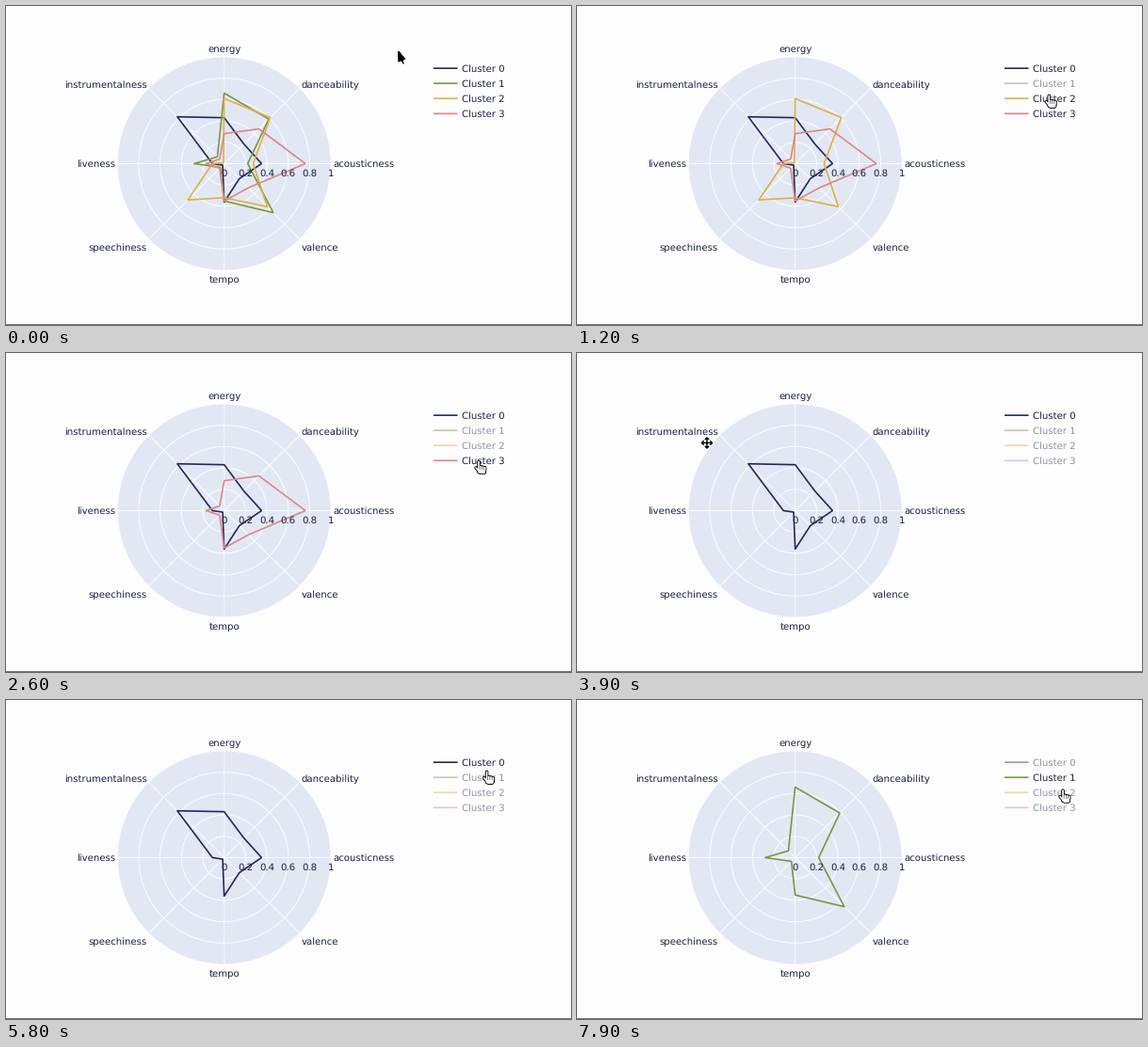
Animation of 600 by 339 pixels, one loop 8000 ms. Source, as a matplotlib script:

```python
import numpy as np
import matplotlib.pyplot as plt
from matplotlib.animation import FuncAnimation
from matplotlib.patches import Circle, Rectangle

W, H, DPI = 600, 339, 64
FRAMES, STEP = 80, 100
CX, CY, R = 231.7, 167.5, 113.5
INK = "#18203f"
PT = 72 / DPI
GAP = (np.nan, np.nan)

plt.rcParams.update({
    "font.family": "DejaVu Sans",
    "font.size": 10.1 * PT,
    "text.hinting": "none",
    "toolbar": "None",
})

FEATURES = ["acousticness", "danceability", "energy", "instrumentalness",
            "liveness", "speechiness", "tempo", "valence"]
CLUSTERS = {
    "#22285f": [.35, .26, .43, .62, .11, .02, .36, .20],
    "#7a983f": [.22, .59, .66, .09, .28, .05, .35, .65],
    "#e2ae42": [.27, .61, .61, .01, .11, .48, .32, .57],
    "#e08586": [.76, .46, .28, .06, .17, .06, .35, .32],
}

# Pointer: (time, x, legend row) for clicks, (time, x, y) for other stops
CLICKS = [(600, 505, 1), (1400, 500, 2), (2500, 502, 3),
          (5900, 508, 1), (7000, 513, 0)]
RESTS = [(-200, 417, 49), (3700, 138, 95.5), (4800, 496, 81),
         (5400, 518, 55), (7400, 531, 46), (7900, 516, 95)]
DWELL, TOGGLE_DELAY = 200, 500


def row_y(n):
    return 66.2 + 16.05 * n


def polar(r, deg):
    a = np.radians(deg)
    return CX + R * r * np.cos(a), CY - R * r * np.sin(a)


def strokes(*lines):
    """Join polylines into one array, separated by gaps."""
    return np.array([p for line in lines for p in [*line, GAP]], float)


def arrow():
    fan = [[(0, 0), (6.6 * s, 10 - 2.8 * s)] for s in np.linspace(0, 1, 7)]
    return strokes(*fan, [(3, 7.5), (5, 12)])


def hand():
    fingers = [[(2.2 * k, 5.8 + .5 * k), (2.2 * k, 10)] for k in (1, 2, 3)]
    palm = [[(0, y), (6.4, y)] for y in (11, 12.3)]
    return strokes([(0, 1.2), (0, 11)], *fingers, *palm,
                   [(-3, 7.6), (0, 11), (1.8, 13), (5.6, 13)])


def crosshair(size):
    return strokes([(-size, 0), (size, 0)], [(0, -size), (0, size)])


def four_arrows():
    tips = []
    for a in np.arange(4) * np.pi / 2:
        along = np.array([np.cos(a), np.sin(a)])
        side = 1.9 * np.array([-along[1], along[0]])
        tips.append([3.7 * along + side, 5.6 * along, 3.7 * along - side])
    return np.vstack([crosshair(5), strokes(*tips)])


# name: (strokes, outline colour, outline width, inner colour, inner width)
POINTERS = {
    "arrow": (arrow(), "white", 2.6, "black", 1.5),
    "hand": (hand(), "black", 3.5, "white", 1.7),
    "cross": (crosshair(6), "white", 2.4, "black", 1.2),
    "move": (four_arrows(), "white", 2.8, "black", 1.4),
}


def pointer_kind(x, y):
    d = np.hypot(x - CX, y - CY)
    if 450 < x < 536 and row_y(-.5) < y < row_y(3.5):
        return "hand"
    if d < R:
        return "cross"
    return "move" if d < R + 21 else "arrow"


STOPS = sorted(RESTS + [(t, x, row_y(n)) for t, x, n in CLICKS])


def pointer_at(t):
    for (t0, *a), (t1, *b) in zip(STOPS, STOPS[1:]):
        if t <= t1:
            break
    u = np.clip((t - t0 - DWELL) / (t1 - t0 - DWELL), 0, 1)
    u = u * u * (3 - 2 * u)
    return np.array(a) * (1 - u) + np.array(b) * u


def is_shown(n, t):
    hits = sum(row == n and t >= when + TOGGLE_DELAY
               for when, _, row in CLICKS)
    return hits % 2 == 0


fig = plt.figure(figsize=(W / DPI, H / DPI), dpi=DPI, facecolor="#fdfdfe")
ax = fig.add_axes([0, 0, 1, 1])
ax.set(xlim=(0, W), ylim=(H, 0))
ax.axis("off")


def stroke(x, y, color, width, z, cap="butt"):
    return ax.plot(x, y, color=color, lw=width * PT, zorder=z, snap=False,
                   solid_joinstyle="round", solid_capstyle=cap)[0]


def label(x, y, text, align="left"):
    return ax.text(x, round(y), text, color=INK, ha=align, va="baseline",
                   zorder=4)


ax.add_patch(Circle((CX, CY), R, fc="#e1e8f4", ec="none"))
ax.add_patch(Rectangle((0, H - 1), W, 1, fc="#747476", ec="none"))

for k in range(6):
    ax.add_patch(Circle((CX, CY), R * k / 5, fc="none", ec="white",
                        lw=.9 * PT, zorder=1))
    label(CX + R * k / 5, 181, f"{k / 5:g}", "center")

for k, name in enumerate(FEATURES):
    px, py = polar(1, 45 * k)
    stroke([CX, px], [CY, py], "white", .9, 1)
    c, s = np.cos(np.pi * k / 4), np.sin(np.pi * k / 4)
    align = ("right", "center", "left")[int(np.sign(round(c, 3))) + 1]
    label(CX + (R + 2.5) * c, CY + 3.7 + 2.2 * abs(2 * s * c) - 122.3 * s,
          name, align)

traces, keys = [], []
for n, (color, values) in enumerate(CLUSTERS.items()):
    xs, ys = polar(np.array(values + values[:1]), np.arange(9) * 45)
    traces.append(stroke(xs, ys, color, 1.65, 2))
    y = row_y(n)
    keys.append((stroke([454, 479.5], [y, y], color, 1.65, 2),
                 label(484, y + 3.9, f"Cluster {n}")))

outer, inner = [stroke([], [], "black", 1, z, "round") for z in (6, 7)]


def draw(i):
    t = i * STEP
    for n, (trace, key) in enumerate(zip(traces, keys)):
        shown = is_shown(n, t)
        trace.set_visible(shown)
        for part in key:
            part.set_alpha(1 if shown else .48)

    pos = pointer_at(t)
    shape, edge, edge_w, fill, fill_w = POINTERS[pointer_kind(*pos)]
    for line, color, width in (outer, edge, edge_w), (inner, fill, fill_w):
        line.set_data(*(shape + pos).T)
        line.set(color=color, lw=width * PT)
    return [*traces, outer, inner]


anim = FuncAnimation(fig, draw, frames=FRAMES, interval=STEP,
                     repeat=True, repeat_delay=0, blit=False)
plt.show()
```
